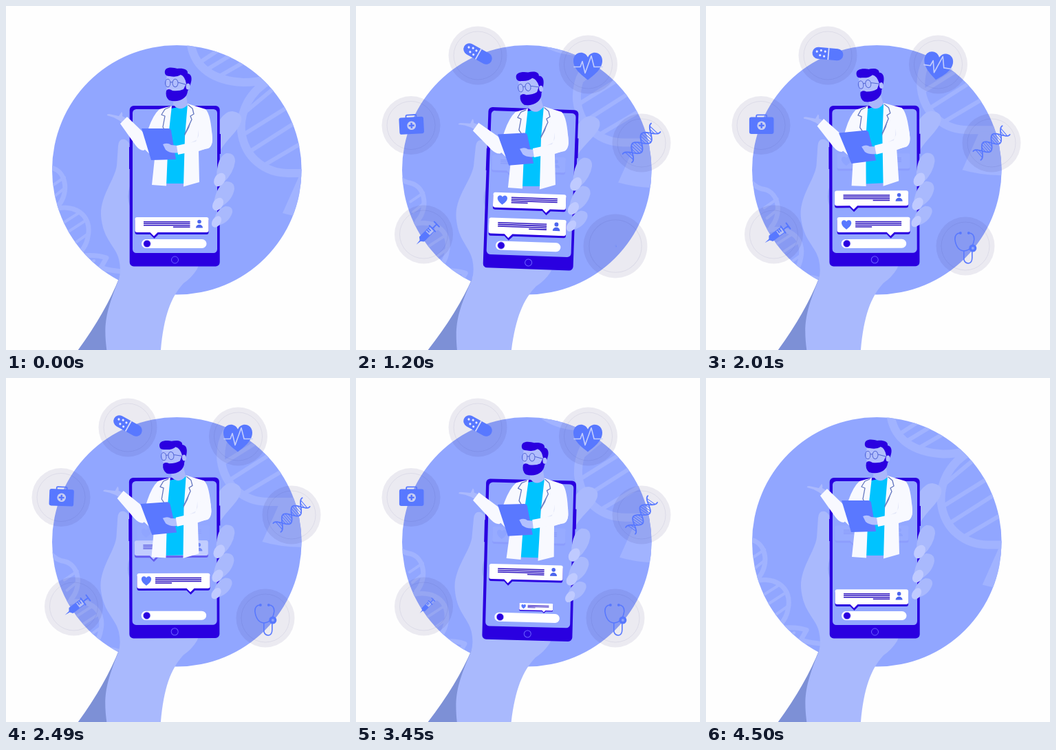
Write an HTML page that moves like this. It is 500 px wide and 500 px high and loops after 4.53 s.

```html
<!DOCTYPE html>
<html lang="en">
<head>
<meta charset="utf-8">
<title>Online doctor</title>
<style>
html, body { margin: 0; height: 100%; overflow: hidden; background: #fefefe; }
svg { display: block; width: 100%; height: 100%; }
.line { fill: none; stroke-linecap: round; stroke-linejoin: round; }
</style>
</head>
<body>
<svg viewBox="0 0 500 500">
  <defs>
    <clipPath id="disc"><circle cx="248.300" cy="238.300" r="181.300"/></clipPath>
    <path id="heartShape" d="M0 20C-7 14-21 5-21-8C-21-21-5-24 0-13C5-24 21-21 21-8C21 5 7 14 0 20Z"/>
    <g id="msgA">
      <path fill="#2a00e0" d="M190.500 309h101q3 0 3 3v17q0 3-3 3h-70l-6 6-6-6h-19q-3 0-3-3v-17q0-3 3-3Z"/>
      <path fill="#fff" d="M190.500 307h101q3 0 3 3v16q0 3-3 3h-71l-5.500 5.500-5.500-5.500h-19q-3 0-3-3v-16q0-3 3-3Z"/>
      <path stroke="#2a10c0" stroke-width="1.500" d="M200 313.700h67.500M200 316.200h67.500M200 318.700h67.500M243 321.200h24.500"/>
      <g fill="#4d66ee"><circle cx="281" cy="313.500" r="2.800"/><path d="M276 322.500c0-6.500 10-6.500 10 0Z"/></g>
    </g>
    <g id="msgB">
      <path fill="#2a00e0" d="M194 309h100q3 0 3 3v17q0 3-3 3h-19l-6 6-6-6h-69q-3 0-3-3v-17q0-3 3-3Z"/>
      <path fill="#fff" d="M194 307h100q3 0 3 3v16q0 3-3 3h-20l-5.500 5.500-5.500-5.500h-69q-3 0-3-3v-16q0-3 3-3Z"/>
      <path stroke="#2a10c0" stroke-width="1.500" d="M217.500 313.700h67M217.500 316.200h67M217.500 318.700h67M217.500 321.200h24"/>
      <use href="#heartShape" fill="#5878ff" transform="translate(204.500 318) scale(.34)"/>
    </g>
  </defs>

  <circle cx="248.300" cy="238.300" r="181.300" fill="#91a6ff"/>
  <g clip-path="url(#disc)" class="line" stroke="#a1b3ff">
    <g id="helixRight">
      <path stroke-width="12" d="M268 50C272 92 305 109 345 111Q364 111 382 106M386 106C352 125 340 155 342 182C347 222 378 243 410 243H475"/>
      <path stroke-width="6" d="M280 83L306 66M291 93L334 67M312 101L352 78M348 154L390 119M345 187L406 149M352 213L418 171M374 232L440 193"/>
      <path fill="#a1b3ff" stroke="none" d="M427 245L402 301Q435 311 490 309V245Z"/>
    </g>
    <g id="helixLeft">
      <path stroke-width="7" d="M30 190Q42 232 66 235C88 240 92 272 76 290M60 298C100 283 126 305 119 335C117 350 108 358 100 366M98 364Q130 360 146 366L138 380Q146 384 170 386"/>
      <path stroke-width="4" d="M66 262L85 249M70 277L86 264M79 318L107 300M86 331L117 311M98 346L119 331M102 386L128 370"/>
    </g>
  </g>

  <g id="badges"></g>

  <g id="device">
    <path fill="#7d90d6" d="M165 394Q145 445 104 501L98 512H155Z"/>
    <path fill="#a9b9fd" d="M163 203Q164 192 173 194Q180 197 184 210L300 300L290 360Q279 378 278 382Q270 395 258 403C238 425 228 455 224 512H148C141 465 143 450 164 397Q168 385 164 368C160 352 147 343 141 322Q138 310 138 302C138 275 158 252 161 232Z"/>
    <path fill="#a9b9fd" d="M300 188C306 172 315 153 329 153Q344 155 342 167C339 181 321 193 311 211L300 220Z"/>
    <path fill="#91a5f4" d="M180 262Q175 277 180 291Z"/>
    <path fill="#2a00e0" d="M179 205h3v32h-3ZM310 186h2v29h-2Z"/>
    <rect x="179.700" y="145" width="131" height="233.500" rx="6" fill="#2a00e0"/>
    <rect x="184" y="150" width="123" height="209" rx="5.500" fill="#92a7ff"/>
    <circle cx="245.500" cy="369" r="5" fill="none" stroke="#6b62ff"/>
    <rect x="197" y="339" width="94.500" height="13" rx="6.500" fill="#fff"/>
    <circle cx="205" cy="345.500" r="5.300" fill="#2a00e0" stroke="#c4caff" stroke-width=".8"/>
    <g id="chat"></g>

    <g id="doctor">
      <path fill="#00c3ff" d="M240 149L250 147L265 143L263 200L259 258H233L234 190Z"/>
      <g id="head">
        <path fill="#a9b7fb" d="M244 131L261 124L264 144Q252 155 243 143Z"/>
        <path fill="#b1befd" d="M234 100Q248 94 263 103L264 124Q248 136 235 125Q231 115 234 100Z"/>
        <path fill="#2a00e0" d="M231 98C229 87 243 89 249 91C257 90 265 92 264 98C270 99 271 106 268 114L264 124C263 135 250 141 237 137Q231 132 233 123Q236 119 242 123Q252 124 258 121L262 113Q260 102 254 100Q248 104 238 102Q232 102 231 98Z"/>
        <ellipse cx="264.500" cy="117" rx="3" ry="4.500" fill="#b1befd"/>
        <path class="line" stroke="#5366d5" d="M231.500 112a3.700 5.700 0 0 1 7.400 0a3.700 5.700 0 0 1-7.400 0M242 112a4 5.700 0 0 1 8 0a4 5.700 0 0 1-8 0M239 111q1.500-1 3 0M250 111L261 114"/>
      </g>
      <path fill="#f8f9ff" d="M241 145L223 150Q214 158 207 178L198 205L216 222L212 260L233 261.500L236 190Z"/>
      <path fill="#f8f9ff" d="M264 142L290 150Q298 157 300 195Q300 204 292 207L280 211L281 256L258 262.500L260 190Z"/>
      <path fill="#e3e7f9" d="M280 180L278 194L262 202L280 210Z"/>
      <path class="line" stroke="#6275bf" stroke-width="1.300" d="M238 147L231 150L226 158L231 160L228 176L235 187M265 144L271 149L273 157L268 160L270 165L260 186"/>
      <path fill="#7185c9" d="M270 164L260 186L259 190L266 177Z"/>
      <g id="arm">
        <path fill="#aab9fd" d="M172 172L164 166Q156 161 147 159Q146 157 150 157L164 160L168 154Q170 155 169 160L176 164Z"/>
        <path fill="#f8f9ff" d="M176 161L205 189Q208 206 200 210Q194 210 188 202L166 171Z"/>
      </g>
      <g id="board">
        <path fill="#5a78ff" d="M197 178H236Q239 178 240 181L247 223L211 224Z"/>
        <path fill="#b2c0ff" d="M228 201Q235 198 240 202L250 203L251 213Q239 215 232 209Z"/>
      </g>
      <path fill="#f8f9ff" d="M248 203L276 197L284 180L299 183Q302 204 294 207L250 216Z"/>
    </g>

    <g fill="#a9b9fd">
      <path d="M306 248Q307 219 320 214Q333 213 333 226Q331 243 316 257Z"/>
      <path d="M302 286Q306 261 320 255Q332 255 332 266Q329 283 312 292Z"/>
      <path d="M302 313Q305 296 319 291Q330 291 329 300Q325 314 309 319Z"/>
    </g>
    <g fill="#bfcaff">
      <ellipse cx="310.500" cy="252.500" rx="7.500" ry="10.500" transform="rotate(32 310.500 252.500)"/>
      <ellipse cx="308" cy="288" rx="7" ry="10" transform="rotate(35 308 288)"/>
      <ellipse cx="306" cy="313.500" rx="6" ry="9" transform="rotate(35 306 313.500)"/>
    </g>
  </g>
</svg>
<script>
const LOOP = 4530;
const get = id => document.getElementById(id);
const clamp = x => Math.max(0, Math.min(1, x));
const ease = x => (1 - Math.cos(Math.PI * clamp(x))) / 2;
const move = (el, value) => el.setAttribute('transform', value);

// Overshooting growth from 0 to 1
function pop(x) {
  const k = clamp(x) - 1;
  return Math.max(0, 1 + 2.7 * k ** 3 + 1.7 * k * k);
}

// Eased value between [time, value] keys, resting at 0 at both loop ends
function track(keys, t) {
  const all = [[0, 0], ...keys, [LOOP, 0]];
  const i = all.findIndex(key => key[0] > t);
  const [t0, v0] = all[i - 1], [t1, v1] = all[i];
  return v0 + (v1 - v0) * ease((t - t0) / (t1 - t0));
}

function group(parent, html) {
  const g = document.createElementNS('http://www.w3.org/2000/svg', 'g');
  g.innerHTML = html;
  parent.append(g);
  return g;
}

// Two crossing waves joined by rungs
function strandIcon() {
  const height = x => 8.5 * Math.sin(x * Math.PI / 18);
  const wave = sign => 'M' + Array.from({length: 41}, (_, i) => {
    const x = i * 1.4 - 28;
    return `${x.toFixed(1)} ${(sign * height(x)).toFixed(1)}`;
  }).join('L');
  let rungs = '';
  for (let x = -24; x <= 24; x += 3) {
    const h = height(x).toFixed(1);
    rungs += `M${x} ${h}V${-h}`;
  }
  return `<g class="line" stroke="#5878ff"><path stroke-width="1.8" d="${wave(1)}${wave(-1)}"/><path d="${rungs}"/></g>`;
}

const icons = {
  syringe: `<path fill="#5878ff" d="M-21 0L-13-1L-10-5H2V5H-10L-13 1Z"/>
    <path fill="#b5c0f5" stroke="#5878ff" d="M2-4.500H12V4.500H2Z"/>
    <path class="line" stroke="#5878ff" stroke-width="2" d="M12-6V6M12 0H21M21-5V5M5-4V0M8-4V0"/>`,
  kit: `<rect x="-17.800" y="-12.200" width="35.600" height="24.400" rx="3" fill="#5878ff"/>
    <path class="line" stroke="#5878ff" stroke-width="1.800" d="M-7.500-12V-14Q-7.500-15.500-6-15.500H6Q7.500-15.500 7.500-14V-12"/>
    <circle r="6.300" fill="#c9cff2"/><path stroke="#5878ff" stroke-width="2.600" d="M-4 0H4M0-4V4"/>`,
  pill: `<rect x="-22.500" y="-8.500" width="45" height="17" rx="8.500" fill="#5878ff"/>
    <path stroke="#d5dafa" stroke-width="1.800" d="M1-8.500V8.500"/>
    <g fill="#e6e9ff"><circle cx="-16" cy="-2" r="1.600"/><circle cx="-11" cy="3" r="1.600"/>
    <circle cx="-10" cy="-4" r="1.600"/><circle cx="-5" cy="4" r="1.600"/><circle cx="-4" cy="-3" r="1.600"/></g>`,
  heart: `<use href="#heartShape" fill="#5878ff"/>
    <path class="line" stroke="#c3cdfc" stroke-width="1.600" d="M-20 1H-11L-8-7L-4 10L5-15L9 1H21"/>`,
  strand: strandIcon(),
  scope: `<g class="line" stroke="#5878ff" stroke-width="1.600">
    <path d="M-8-19Q-16-19-16-10Q-14 6-3 7Q10 6 12-10Q12-19 4-19M-3 7V19Q-2 25 4 25Q9 24 9 17V8"/></g>
    <g fill="#5878ff"><circle cx="-8" cy="-19" r="2"/><circle cx="4" cy="-19" r="2"/><circle cx="10" cy="3" r="5.500"/></g>
    <circle cx="10" cy="3" r="2" fill="#8ea3f8"/>`
};

// Badge centre, icon offset, resting angle, wiggle keys
const badges = [
  ['syringe', 98.5, 332, 4, 0, -45, [[1600, 0], [2010, 9], [2910, 8], [3300, 0]]],
  ['kit', 80, 173.5, .7, .3, 0, [[800, 0], [1200, -3], [2010, 0], [2910, 4], [3400, 0]]],
  ['pill', 177, 72, 0, -2.5, 29, [[1700, 0], [2010, -24], [2320, 0]]],
  ['heart', 337.5, 85, -.5, 2.5, 0, [[1700, 0], [2010, 9], [2320, 0]]],
  ['strand', 415, 199, 0, 0, -41, [[1200, -6], [2010, 0], [2910, 0], [3450, -14], [3900, 0]]],
  ['scope', 377, 349, .8, 0, 0, [[2600, 0], [2910, 3], [3300, 0]]]
].map(([name, x, y, dx, dy, angle, wiggle], i) => ({
  x, y, dx, dy, angle, wiggle, i,
  disc: group(get('badges'), `<g fill="#281e6e"><circle r="42.500" fill-opacity=".085"/>
    <circle r="35" fill="none" stroke="#281e6e" stroke-opacity=".07"/></g>`),
  icon: group(get('badges'), icons[name])
}));

const starts = [-1000, 240, 1030, 1600, 2570, 3405, 4355];
const messages = starts.map((start, i) => ({
  start, i,
  x: i % 2 ? 268 : 215,
  el: group(get('chat'), `<use href="#msg${i % 2 ? 'B' : 'A'}"/>`)
}));

function drawBadge(b, t) {
  const inAt = 45 + 190 * b.i, outAt = 145 * b.i;
  const size = (start, end, fall) =>
    t < end ? pop((t - start) / 400) : pop(1 - (t - end) / fall);
  const angle = b.angle + track(b.wiggle, t);
  move(b.disc, `translate(${b.x} ${b.y}) scale(${size(inAt, 3480 + outAt, 250)})`);
  move(b.icon, `translate(${b.x + b.dx} ${b.y + b.dy}) rotate(${angle}) scale(${size(inAt + 200, 3320 + outAt, 160)})`);
}

// Older messages make room just before the next one grows
function drawMessage(m, t) {
  const shift = n => m.i + n < starts.length ? ease((t - starts[m.i + n] + 180) / 180) : 0;
  const up = shift(1), away = shift(2), last = starts.length - 1;
  let alpha = (1 - .95 * away) * (1 - shift(3));
  if (m.i === last - 1) alpha *= 1 - up;
  const s = pop((t - m.start) / 400);
  m.el.setAttribute('opacity', alpha);
  move(m.el, `translate(${m.x} ${339 - 38.5 * up - 54 * away}) scale(${s}) translate(${-m.x} -339)`);
}

function draw(t) {
  const drift = Math.sin(Math.PI * t / LOOP) ** 1.2;
  move(get('helixRight'), `translate(${-30 * drift} ${-64 * drift})`);
  move(get('helixLeft'), `translate(${19 * drift} ${32 * drift})`);

  const sway = track([[1200, 2], [2200, -.3], [3700, 1.6], [4500, 0]], t);
  const lean = track([[600, .3], [1200, -2], [2010, -2.5], [2910, .8], [3450, .2]], t);
  const nod = track([[600, -11], [1200, -8], [2010, -5], [2910, -6], [3450, -1.5]], t);
  const wave = track([[600, -8], [1200, -9], [2010, 0], [2910, -8], [3450, -9]], t);
  const dip = track([[500, 3], [4000, 3]], t);
  move(get('device'), `rotate(${sway} 135 517)`);
  move(get('doctor'), `rotate(${lean} 246 260)`);
  move(get('head'), `rotate(${nod} 256 148)`);
  move(get('arm'), `rotate(${wave} 203 206)`);
  move(get('board'), `translate(0 ${dip}) rotate(${-dip} 225 180)`);

  badges.forEach(b => drawBadge(b, t));
  messages.forEach(m => drawMessage(m, t));
}

const begin = performance.now();
function tick() {
  draw((performance.now() - begin) % LOOP);
  requestAnimationFrame(tick);
}
tick();
</script>
</body>
</html>
```
